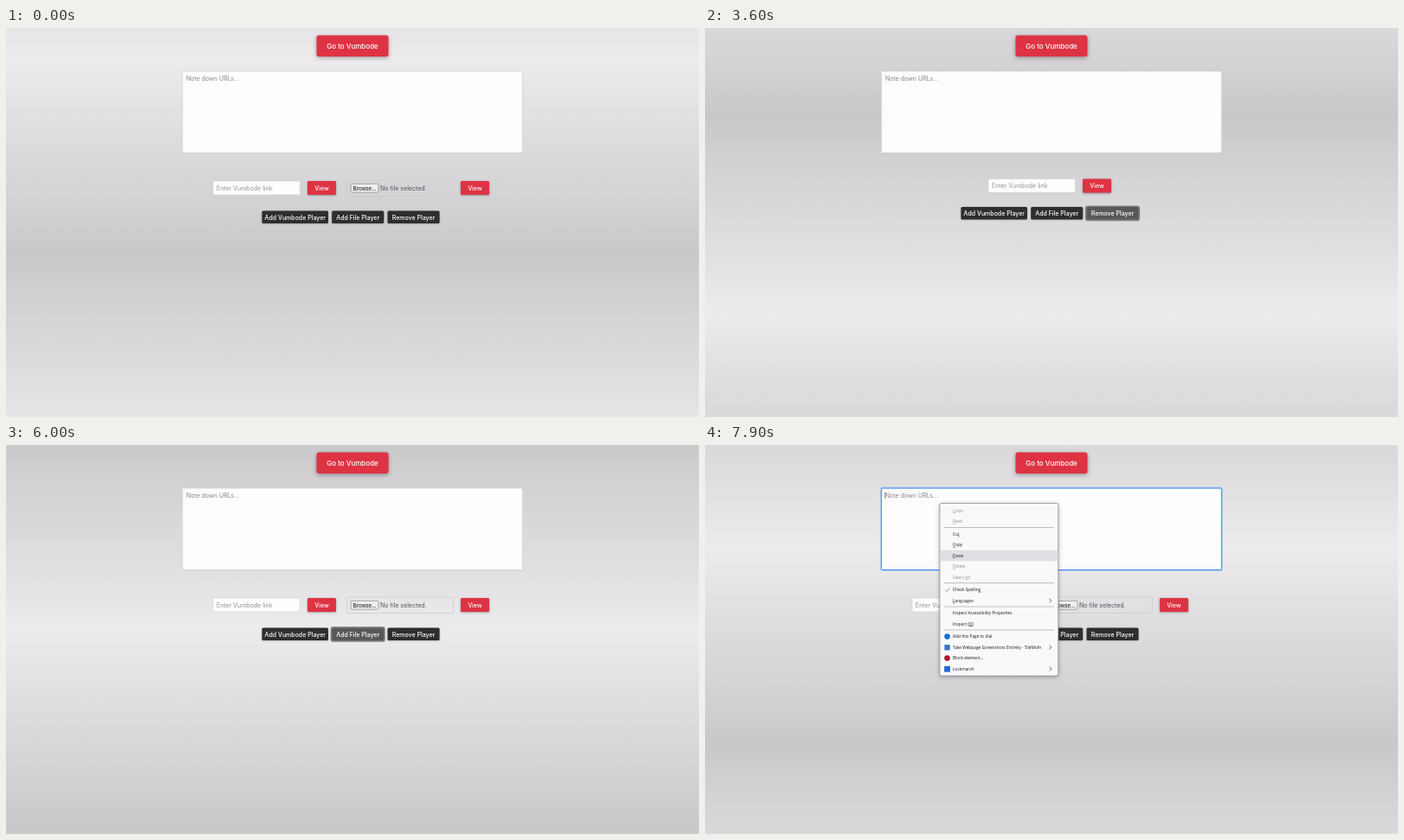
An HTML page with a canvas for the animation above (8 s loop, 800 by 450 pixels).

```html
<!DOCTYPE html>
<html lang="en">
<head>
<meta charset="utf-8">
<title>Video page</title>
<style>
  html, body { margin: 0; width: 100%; height: 100%; overflow: hidden; background: #dbd9dc; }
  canvas { display: block; width: 800px; height: 450px; }
</style>
</head>
<body>
<canvas id="stage" width="800" height="450"></canvas>
<script>
const ctx = document.getElementById('stage').getContext('2d');
const LOOP = 8000;
const UI = 'Inter, sans-serif';
const SYS = '"Open Sans", sans-serif';
const RED = [222, 51, 66], RED_HOVER = [200, 35, 51];
const DARK = [48, 45, 49], DARK_HOVER = [90, 87, 91];
const EDGE = '#c9ccd2';

// Times of the user's actions, in ms
const T = {
  goIn: 1500, goOut: 2950,
  removeIn: 3250, remove1: 3400, remove2: 3950,
  addLinkIn: 4650, addLink: 4900,
  addFileIn: 5700, addFile: 5900, addFileOut: 6250,
  focus: 6600, menu: 7100, cut: 7400, copy: 7500, paste: 7600
};

const between = (t, a, b) => t >= a && t < b;
const clamp = v => Math.max(0, Math.min(1, v));
const rgb = c => `rgb(${c.map(Math.round).join(',')})`;
const mix = (a, b, k) => rgb(a.map((v, i) => v + (b[i] - v) * k));
const fade = (t, on, off) => clamp((t - on) / 150) * (1 - clamp((t - off) / 150));

function track(points, t) {
  let i = 1;
  while (i < points.length - 1 && t > points[i][0]) i++;
  const [t0, v0] = points[i - 1], [t1, v1] = points[i];
  return v0 + (v1 - v0) * (t - t0) / (t1 - t0);
}

function box(x, y, w, h, r, fill, stroke, line = 0.8) {
  ctx.beginPath();
  ctx.roundRect(x, y, w, h, r);
  if (fill) { ctx.fillStyle = fill; ctx.fill(); }
  if (stroke) { ctx.strokeStyle = stroke; ctx.lineWidth = line; ctx.stroke(); }
}

function shadowBox(x, y, w, h, r, fill, blur, dy, alpha) {
  ctx.save();
  ctx.shadowColor = `rgba(0,0,0,${alpha})`;
  ctx.shadowBlur = blur;
  ctx.shadowOffsetY = dy;
  box(x, y, w, h, r, fill);
  ctx.restore();
}

// y is the middle of the capitals
function label(str, x, y, size, color, { font = UI, weight = 400, align = 'left' } = {}) {
  ctx.font = `${weight} ${size}px ${font}`;
  ctx.textAlign = align;
  ctx.fillStyle = color;
  ctx.fillText(str, x, y + size * 0.36);
}

function background(t) {
  const path = [[0, 262], [1200, 224], [2600, 152], [3600, 103],
                [5200, 25], [7000, -57], [8000, -112]];
  const half = 226, dark = track(path, t);
  const tones = [201, 211, 219, 227, 237];
  const top = dark - 2 * half, span = 6 * half;
  const g = ctx.createLinearGradient(0, top, 0, top + span);
  for (let i = 0; i <= 24; i++) {
    const v = tones[4 - Math.abs(4 - i % 8)];
    g.addColorStop(i / 24, `rgb(${v},${v - 2},${v + 1})`);
  }
  ctx.fillStyle = g;
  ctx.fillRect(0, 0, 800, 450);
}

function goButton(t) {
  const fill = mix(RED, RED_HOVER, fade(t, T.goIn, T.goOut));
  shadowBox(358.5, 8.5, 83, 24.5, 2.5, fill, 5, 1.5, 0.35);
  label('Go to Vumbode', 400, 20.8, 8, '#fff', { weight: 500, align: 'center' });
}

function notes(t) {
  const focused = t >= T.focus;
  if (focused) box(203.2, 49.5, 393.6, 95.5, 2, null, 'rgba(120,180,250,.45)', 2);
  box(203.7, 50, 392.6, 94.5, 1, '#fdfdfd', focused ? '#3a88e4' : EDGE, focused ? 1 : 0.7);
  label('Note down URLs...', 208, 58.2, 7, '#85828a');
  if (focused && (t - T.focus) % 1000 < 500) {
    ctx.fillStyle = '#444';
    ctx.fillRect(207.6, 54.5, 0.6, 7.5);
  }
}

function viewButton(x, y) {
  shadowBox(x, y, 33, 16, 1.5, rgb(RED), 2.5, 0.8, 0.35);
  label('View', x + 16.5, y + 8.2, 7, '#fff', { weight: 500, align: 'center' });
}

function linkPlayer(x, y) {
  box(x, y, 100.5, 16, 1.5, '#fdfdfd', EDGE, 0.6);
  label('Enter Vumbode link', x + 4, y + 8.2, 7, '#919096');
  viewButton(x + 109, y);
}

function filePlayer(x, y) {
  box(x, y - 1, 123, 18.5, 1.5, null, EDGE);
  box(x + 4.8, y + 3.3, 31.8, 9.8, 1, '#efeff0', '#929297', 0.8);
  label('Browse...', x + 20.8, y + 8.2, 6.5, '#111',
        { font: '"Liberation Sans", Arial, sans-serif', align: 'center' });
  label('No file selected.', x + 38.6, y + 8.2, 7, '#55535a');
  viewButton(x + 131.6, y);
}

function darkButton(str, x, w, y, hover, ring) {
  if (ring) box(x - 0.7, y - 0.7, w + 1.4, 16, 2, null, 'rgba(80,77,82,.6)', 1.8);
  shadowBox(x, y, w, 14.5, 1.5, mix(DARK, DARK_HOVER, hover), 2, 0.5, 0.3);
  label(str, x + w / 2, y + 7.4, 7, '#fff', { weight: 500, align: 'center' });
}

function players(t) {
  const both = t < T.remove1 || t >= T.addFile;
  const none = between(t, T.remove2, T.addLink);
  let y = 207;
  if (both) {
    linkPlayer(239, 177);
    filePlayer(393.3, 177);
    y = 211.6;
  } else if (none) {
    y = 174.5;
  } else {
    linkPlayer(327, 174.6);
  }
  darkButton('Add Vumbode Player', 295.5, 76.5, y,
             fade(t, T.addLinkIn, T.addLink), between(t, T.addLink, T.addFile));
  darkButton('Add File Player', 376.2, 60, y,
             fade(t, T.addFileIn, T.addFileOut), between(t, T.addFile, T.focus));
  darkButton('Remove Player', 440.5, 60, y,
             fade(t, T.removeIn, T.remove2), between(t, T.remove1, T.addLink));
}

function status(t) {
  if (!between(t, T.goIn + 100, T.goOut)) return;
  box(-2, 442.3, 64.2, 10, 1, '#f8f7f9', '#c5c3c8', 0.6);
  label('https://vumbode.example', 1.6, 446.4, 5, '#333', { font: SYS });
}

// text, middle, index of the underlined letter, disabled
const ITEMS = [
  ['Undo', 76, 0, true], ['Redo', 88.5, 0, true],
  ['Cut', 103, 2], ['Copy', 115.5, 0], ['Paste', 128, 0],
  ['Delete', 140.5, 0, true], ['Select All', 153, 7, true],
  ['Check Spelling', 167.5, 13], ['Languages', 180.3, 0],
  ['Inspect Accessibility Properties', 194.6, -1], ['Inspect (Q)', 207.2, 9],
  ['Add this Page to dial', 221.6, -1],
  ['Take Webpage Screenshots Entirely - TileMoth', 234.1, -1],
  ['Block element...', 246.6, -1], ['Lockmarsh', 259.1, -1]
];

function line(points, color, width) {
  ctx.beginPath();
  points.forEach(([x, y]) => ctx.lineTo(x, y));
  ctx.strokeStyle = color;
  ctx.lineWidth = width;
  ctx.stroke();
}

function dot(y, color) {
  ctx.beginPath();
  ctx.arc(279.6, y, 3.3, 0, Math.PI * 2);
  ctx.fillStyle = color;
  ctx.fill();
}

function menu(t) {
  if (t < T.menu) return;
  shadowBox(271, 67.5, 136.8, 199.5, 2, '#f9f9fb', 5, 1, 0.35);
  box(271, 67.5, 136.8, 199.5, 2, null, '#9b9aa2', 0.9);
  const hover = t >= T.paste ? 128 : t >= T.copy ? 115.5 : t >= T.cut ? 103 : 0;
  if (hover) box(271.5, hover - 6.3, 135.8, 12.5, 0, '#e0e0e4');
  for (const y of [95.5, 159.6, 187, 214]) line([[276, y], [403, y]], '#aeadb3', 0.8);

  for (const [str, y, key, off] of ITEMS) {
    const color = off ? '#918f96' : '#1c1b22';
    label(str, 286, y, 4.8, color, { font: SYS });
    if (key < 0) continue;
    const x = 286 + ctx.measureText(str.slice(0, key)).width;
    ctx.fillRect(x, y + 2.4, ctx.measureText(str[key]).width, 0.5);
  }

  line([[277.3, 167.8], [279, 169.5], [282, 165.6]], '#77757c', 0.7);
  for (const y of [180, 234, 259]) line([[397.6, y - 2.4], [400, y], [397.6, y + 2.4]], '#55535a', 0.8);
  dot(221.6, '#1670d2');
  box(276.4, 231, 6.4, 6.4, 0, '#3b78c4');
  dot(246.6, '#a5182b');
  box(276.2, 255.8, 6.8, 6.8, 0, '#2465d8');
}

function draw(t) {
  background(t);
  goButton(t);
  notes(t);
  players(t);
  status(t);
  menu(t);
}

const start = performance.now();
function tick() {
  draw((performance.now() - start) % LOOP);
  requestAnimationFrame(tick);
}
tick();
</script>
</body>
</html>
```
